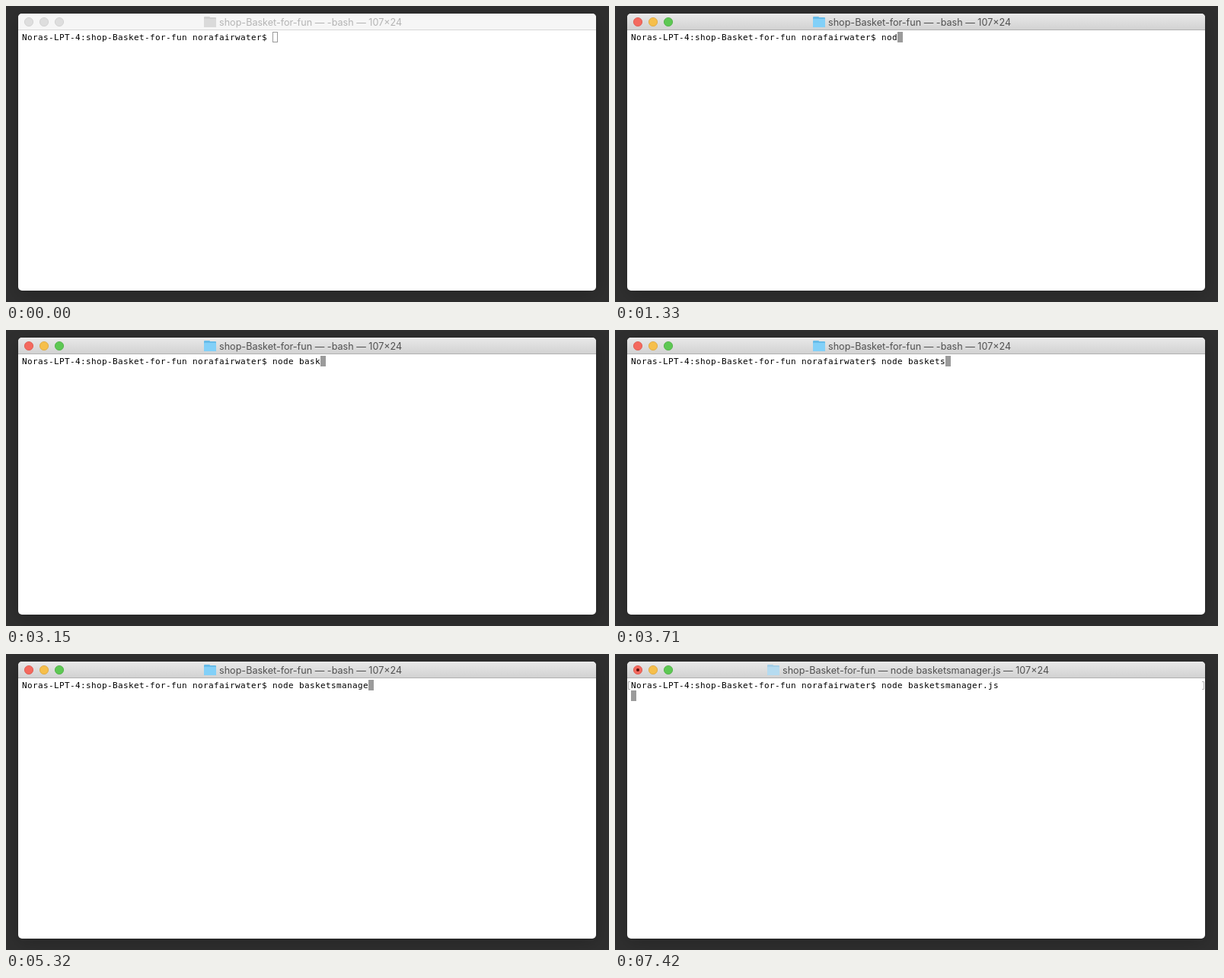
Write an HTML page with a canvas that moves like this. It is 792 by 390 pixels and loops after 8 s.

```html
<!DOCTYPE html>
<html lang="en">
<head>
<meta charset="utf-8">
<title>Terminal</title>
<style>
  html, body { margin: 0; width: 100%; height: 100%; overflow: hidden; background: #2d2d2d; }
  canvas { display: block; width: 792px; height: 390px; }
</style>
</head>
<body>
<canvas id="stage" width="792" height="390"></canvas>
<script>
const ctx = document.getElementById('stage').getContext('2d');

const LOOP = 8000, FOCUS = 350, ENTER = 6090, RUN = 6160;
const CELL = 7, ROW = 14, LEFT = 21, TOP = 34;
const DIR = 'shop-Basket-for-fun';
const PROMPT = `Noras-LPT-4:${DIR} norafairwater$ `;
const COMMAND = 'node basketsmanager.js';
// One key press per character of COMMAND
const KEYS = [910, 1050, 1330, 1610, 1750, 2030, 2870, 3010, 3150, 3500, 3570,
  3710, 4130, 4270, 4410, 4970, 5040, 5250, 5390, 5530, 5810, 5950];

function box(x, y, w, h, r, fill) {
  ctx.fillStyle = fill;
  ctx.beginPath();
  ctx.roundRect(x, y, w, h, r);
  ctx.fill();
}

function backdrop() {
  ctx.fillStyle = '#2f2f2f';
  ctx.fillRect(0, 0, 792, 390);
  ctx.save();
  ctx.shadowColor = 'rgba(0,0,0,.22)';
  ctx.shadowBlur = 24;
  ctx.shadowOffsetY = 5;
  box(16, 10, 759, 365, 5, '#fff');
  ctx.restore();
}

function titleBar(active) {
  let fill = '#f6f6f6';
  if (active) {
    fill = ctx.createLinearGradient(0, 10, 0, 31);
    fill.addColorStop(0, '#e9e9e9');
    fill.addColorStop(1, '#d2d2d2');
  }
  box(16, 10, 759, 21, [5, 5, 0, 0], fill);
  ctx.fillStyle = active ? '#b1b1b1' : '#d6d6d6';
  ctx.fillRect(16, 31, 759, 1);
}

function light(x, fill, edge) {
  ctx.beginPath();
  ctx.arc(x, 21, 5.6, 0, Math.PI * 2);
  ctx.fillStyle = fill;
  ctx.fill();
  ctx.lineWidth = 0.8;
  ctx.strokeStyle = edge;
  ctx.stroke();
}

function lights(active, running) {
  const on = [['#f4695e', '#dc5247'], ['#f6bf4b', '#dda437'], ['#5dc853', '#48ad3e']];
  on.forEach((pair, i) => light(30 + i * 20, ...(active ? pair : ['#dedede', '#cdcdcd'])));
  if (running) box(28, 19, 4, 4, 2, '#5a0d08');
}

function folder(x, back, front) {
  box(x, 14, 8, 5, 1, back);
  box(x, 15, 16, 13, 1, back);
  box(x, 17, 16, 11, 1, front);
}

function heading(active, running) {
  const x = running ? 200 : 260;
  if (running) folder(x, '#a5cfe8', '#b5dbf0');
  else if (active) folder(x, '#67bce9', '#82d0f8');
  else folder(x, '#cfcfcf', '#dadada');
  ctx.font = '12.6px Inter, sans-serif';
  ctx.fillStyle = active ? '#505050' : '#b4b4b4';
  ctx.fillText(`${DIR} — ${running ? COMMAND : '-bash'} — 107×24`, x + 20, 26);
}

function bracket(x, dir) {
  ctx.strokeStyle = '#b0b0b0';
  ctx.lineWidth = 1;
  ctx.beginPath();
  ctx.moveTo(x + 2.5 * dir, 36.5);
  ctx.lineTo(x, 36.5);
  ctx.lineTo(x, 46.5);
  ctx.lineTo(x + 2.5 * dir, 46.5);
  ctx.stroke();
}

function cursor(col, row, active) {
  const x = LEFT + col * CELL, y = TOP + row * ROW;
  if (active) {
    ctx.fillStyle = '#9b9b9b';
    ctx.fillRect(x, y, CELL, ROW);
  } else {
    ctx.strokeStyle = '#999';
    ctx.lineWidth = 1;
    ctx.strokeRect(x + 0.5, y + 0.5, CELL - 1, ROW - 1);
  }
}

function draw(t) {
  const active = t >= FOCUS, entered = t >= ENTER, running = t >= RUN;
  const line = PROMPT + COMMAND.slice(0, KEYS.filter(k => k <= t).length);

  backdrop();
  titleBar(active);
  lights(active, running);
  heading(active, running);

  if (entered) {
    bracket(17.5, 1);
    bracket(773.5, -1);
    cursor(0, 1, true);
  } else {
    cursor(line.length, 0, active);
  }
  ctx.font = '11px "DejaVu Sans Mono", monospace';
  ctx.fillStyle = '#000';
  [...line].forEach((ch, i) => ctx.fillText(ch, LEFT + i * CELL, 45));
}

const start = performance.now();
function tick() {
  draw((performance.now() - start) % LOOP);
  requestAnimationFrame(tick);
}
tick();
</script>
</body>
</html>
```
